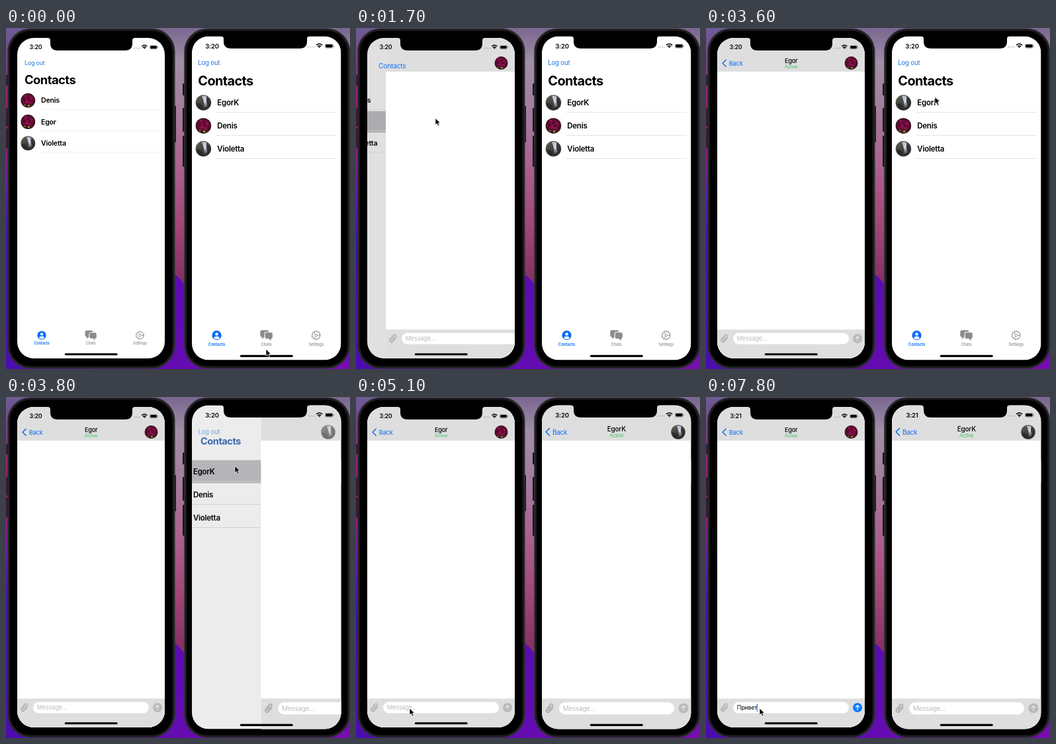
Write an HTML page that moves like this. It is 520 px wide and 516 px high and loops after 8 s.

```html
<!DOCTYPE html>
<html lang="en">
<head>
<meta charset="utf-8">
<title>Two phones, one chat</title>
<style>
  html, body { margin: 0; width: 100%; height: 100%; overflow: hidden; background: #3a0ca3; }
  svg { display: block; width: 520px; height: 516px; }
  text { font-family: Inter, Roboto, "Liberation Sans", sans-serif; letter-spacing: -.02em; white-space: pre; }
</style>
</head>
<body>
<svg id="stage" viewBox="0 0 520 516" xmlns="http://www.w3.org/2000/svg">
  <defs>
    <linearGradient id="sky" x2="0" y2="1">
      <stop offset="0" stop-color="#7a6690"/><stop offset=".1" stop-color="#a08fa6"/>
      <stop offset=".25" stop-color="#a57b9c"/><stop offset=".42" stop-color="#aa608c"/>
      <stop offset=".57" stop-color="#a14878"/><stop offset=".74" stop-color="#863062"/>
    </linearGradient>
    <linearGradient id="edge" x2="0" y2="1">
      <stop offset="0" stop-color="#6d5c94"/><stop offset=".12" stop-color="#7c3a86"/>
      <stop offset=".22" stop-color="#98206f"/><stop offset=".34" stop-color="#951f76"/>
      <stop offset=".46" stop-color="#6a1fa0"/><stop offset=".6" stop-color="#430fb0"/>
    </linearGradient>
    <linearGradient id="wave" x2="1" y2=".3">
      <stop offset="0" stop-color="#400eac"/><stop offset=".5" stop-color="#550cb0"/>
      <stop offset="1" stop-color="#760cb2"/>
    </linearGradient>
    <linearGradient id="rock" x2=".5" y2="1">
      <stop offset="0" stop-color="#62645c"/><stop offset=".5" stop-color="#454840"/>
      <stop offset="1" stop-color="#2a2d2b"/>
    </linearGradient>
    <linearGradient id="fall" x2="0" y2="1">
      <stop offset="0" stop-color="#b9bacb"/><stop offset=".5" stop-color="#d4d4e2"/>
      <stop offset="1" stop-color="#80828e" stop-opacity=".4"/>
    </linearGradient>
    <radialGradient id="bloom">
      <stop offset="0" stop-color="#870e44"/><stop offset=".65" stop-color="#6c0a38"/>
      <stop offset="1" stop-color="#33121f"/>
    </radialGradient>
  </defs>
</svg>
<script>
const NS = 'http://www.w3.org/2000/svg';
const LOOP = 8000, STEP = 100;
const BLUE = '#0a6cf5', GREY = '#8b8b8b', BAR = '#dedede';
const stage = document.getElementById('stage');

function el(tag, attrs, parent = stage) {
  const node = document.createElementNS(NS, tag);
  set(node, attrs);
  return parent.appendChild(node);
}
function set(node, attrs) {
  for (const key in attrs) node.setAttribute(key, attrs[key]);
}
const show = (node, on) => set(node, { display: on ? 'inline' : 'none' });
const clamp = v => Math.max(0, Math.min(1, v));
const mix = (a, b, p) => a + (b - a) * p;

const group = (parent, attrs = {}) => el('g', attrs, parent);
const path = (parent, d, attrs) => el('path', { d, ...attrs }, parent);
const circle = (parent, cx, cy, r, fill, attrs) => el('circle', { cx, cy, r, fill, ...attrs }, parent);
const rect = (parent, x, y, width, height, fill, rx = 0, attrs) =>
  el('rect', { x, y, width, height, fill, rx, ...attrs }, parent);

// Text placed by the middle of its capitals.
function label(parent, str, x, cy, size, fill = '#000', weight = 400, anchor = 'start') {
  const node = el('text', {
    x, y: cy + size * .364, 'font-size': size, fill, 'font-weight': weight, 'text-anchor': anchor
  }, parent);
  node.textContent = str;
  return node;
}

function avatar(parent, kind, cx, cy, r) {
  const g = group(parent, { transform: `translate(${cx} ${cy}) scale(${r / 10})` });
  if (kind === 'fall') {
    circle(g, 0, 0, 10, 'url(#rock)');
    path(g, 'M-2-8.5Q1-9.5 4-8Q3-2 5 4Q3 7 1 6Q1-2-2-8.5Z', { fill: 'url(#fall)' });
    path(g, 'M-9 1Q-4 0-1 5L-2 9.6Q-7 8-9 1Z', { fill: '#222522', opacity: .7 });
    path(g, 'M5-7Q9-4 9 3L6 5Q4-1 5-7Z', { fill: '#2b2d2a', opacity: .6 });
  } else {
    circle(g, 0, 0, 10, 'url(#bloom)');
    for (let i = 0; i < 9; i++) {
      const a = i * 2.4, d = 2 + i * .75;
      circle(g, Math.cos(a) * d, Math.sin(a) * d, 1.5, i % 2 ? '#980f50' : '#430a29');
    }
    path(g, 'M-7.5 5Q0 4 7.5 5.5Q4 10 0 10T-7.5 5Z', { fill: '#2c2a22', opacity: .65 });
    circle(g, 1, 7.3, 1.3, '#cf8a3a');
    circle(g, -4.5, 6.4, .9, '#a8702f');
  }
  return g;
}

function tabBar(parent, c) {
  const g = group(parent);
  const icon = i => group(g, { transform: `translate(${c.tabs + i * c.tabGap} 465) scale(${c.k})` });
  const person = icon(0), chats = icon(1), gear = icon(2);

  circle(person, 0, 0, 6.6, BLUE);
  circle(person, 0, -1.7, 2.1, '#fff');
  path(person, 'M-4 4.1Q-3.6 1.3 0 1.3T4 4.1Q2.2 5.6 0 5.6T-4 4.1Z', { fill: '#fff' });

  rect(chats, -8.6, -7.2, 12, 9.6, GREY, 2.4);
  path(chats, 'M-6 1V5.6L-1.5 1Z', { fill: GREY });
  rect(chats, -2.3, -4.4, 11.3, 9.5, GREY, 2.6, { stroke: '#fff' });
  path(chats, 'M3 4.5L6.5 7.6V4Z', { fill: GREY });

  const line = { fill: 'none', stroke: GREY, 'stroke-width': .8 };
  circle(gear, 0, 0, 5.3, 'none', line);
  circle(gear, 0, 0, 6.1, 'none', { ...line, 'stroke-width': 1, 'stroke-dasharray': '1.6 1.6' });
  circle(gear, 0, 0, 1.7, 'none', line);
  path(gear, 'M1.7 0H5M-.9-1.5L-2.6-4.5M-.9 1.5L-2.6 4.5', line);

  ['Contacts', 'Chats', 'Settings'].forEach((name, i) =>
    label(g, name, c.tabs + i * c.tabGap, c.tabText, 5.6 * c.k, i ? GREY : BLUE, i ? 500 : 600, 'middle'));
  return g;
}

function statusBar(parent, c) {
  const clock = label(parent, '', c.clockX, c.statusY, 8.8 * c.k, '#000', 600, 'middle');
  const g = group(parent, { transform: `translate(${c.wifiX} ${c.statusY}) scale(${c.k})` });
  for (let i = 0; i < 4; i++) circle(g, -15.3 + i * 2.7, 1.4, .75, '#9a9a9a');
  const arc = { fill: 'none', stroke: '#000', 'stroke-width': 1.3 };
  path(g, 'M-4.2-1.2Q0-4.8 4.2-1.2M-2.5.8Q0-1.3 2.5.8', arc);
  path(g, 'M-1.3 1.6Q0 .5 1.3 1.6L0 3Z', {});
  rect(g, 8.2, -2.7, 11, 5.6, '#fff', 1.6, { stroke: '#777', 'stroke-width': .6 });
  rect(g, 8.9, -2, 9.6, 4.2, '#000', 1);
  rect(g, 19.8, -.9, .9, 2, '#777', .4);
  return clock;
}

function inputBar(parent, c) {
  rect(parent, c.x, 456.3, c.w, 60, BAR);
  const y = c.inputY, h = 17 * c.k;
  const clip = group(parent, { transform: `translate(${c.clipX} ${y}) scale(${c.k}) rotate(40)` });
  path(clip, 'M2.9-3.6V3.6A2.9 2.9 0 0 1-2.9 3.6V-4.4A2 2 0 0 1 1.2-4.4V2.8A1 1 0 0 1-1 2.8V-3',
    { fill: 'none', stroke: '#8f8f8f', 'stroke-width': .9, 'stroke-linecap': 'round' });
  rect(parent, c.fieldX, y - h / 2, c.fieldW, h, '#fff', h / 2);
  const hint = label(parent, 'Message...', c.fieldX + 5.7, y, 9.2 * c.k, '#bcbcc0');
  const text = label(parent, '', c.fieldX + 5.8, y, 8.8 * c.k);
  const caret = rect(parent, 0, y - 6, 1.1, 12, '#2f6cf0');
  const send = group(parent, { transform: `translate(${c.sendX} ${y}) scale(${c.k})` });
  const disc = circle(send, 0, 0, 7, '#b9b9b9');
  const arrow = path(send, 'M0 3.6V-3.3M-2.8-.7L0-3.5L2.8-.7',
    { fill: 'none', 'stroke-width': 1.2, 'stroke-linecap': 'round', 'stroke-linejoin': 'round' });
  return (typed, focused) => {
    show(hint, !typed);
    text.textContent = typed;
    show(caret, focused);
    set(caret, { x: c.fieldX + 5.5 + (typed ? text.getComputedTextLength() : 0) });
    set(disc, { fill: typed ? '#087bff' : '#b9b9b9' });
    set(arrow, { stroke: typed ? '#fff' : '#e4e4e4' });
  };
}

function phone(c) {
  const { x, y, w, h, k } = c, right = x + w;

  c.buttons.forEach(([bx, by, bh]) => rect(stage, bx, by, 4, bh, '#17171a', 1));
  rect(stage, c.outX, 1.5, c.outW, 513, '#000', 34, { stroke: '#2e2e31', 'stroke-width': 2 });
  rect(stage, c.outX + 2, 3.5, c.outW - 4, 509, '#000', 32, { stroke: '#1b1b1d', 'stroke-width': 2 });

  const id = 'screen' + x;
  rect(el('clipPath', { id }), x, y, w, h, '#fff', 25);
  const screen = group(stage, { 'clip-path': `url(#${id})` });
  rect(screen, x, y, w, h, '#fff');

  const list = group(screen);
  const rowY = i => c.rowY + i * c.rowH;
  const picked = rect(list, x, rowY(c.pick) - c.rowH / 2, w * 1.4, c.rowH, '#c4c4c8');
  c.people.forEach(([name, kind], i) => {
    avatar(list, kind, c.avatarX, rowY(i), 10.9 * k);
    label(list, name, c.nameX, rowY(i), 10.6 * k, '#000', 600);
    rect(list, c.nameX - 1.5, rowY(i) + 13.6 * k - .4, right - 5.5 - c.nameX, .8, c.rule);
  });
  const tabs = tabBar(screen, c);
  const dim = rect(screen, x, y, w, h, '#000');

  const chat = group(screen);
  rect(chat, x, y, w, h, '#fff');
  rect(chat, x, y, w, 65.5 - y, BAR);
  rect(chat, x, 65.2, w, .5, '#d2d2d2');
  const input = inputBar(chat, c);

  const logOut = label(screen, 'Log out', c.titleX, c.navY, 8.9 * k, '#1f76de');
  const title = label(screen, 'Contacts', 0, 0, 18);
  title.style.letterSpacing = '-.03em';
  const face = avatar(screen, c.people[c.pick][1], c.faceX, 53, 10 * k);
  const nav = group(screen);
  path(nav, `M${c.backX + 5.2 * k} ${c.navY - 5 * k}l${-5 * k} ${5 * k}l${5 * k} ${5 * k}`,
    { fill: 'none', stroke: BLUE, 'stroke-width': 1.5, 'stroke-linecap': 'round', 'stroke-linejoin': 'round' });
  label(nav, 'Back', c.backX + 8.9 + k, c.navY + .3, 9.2 * k, BLUE);
  label(nav, c.people[c.pick][0], c.mid, 49.2 - (k - 1) * 10, 9.2 * k, '#000', 500, 'middle');
  label(nav, 'Active', c.mid, 58.7, 6.9 * k, '#3fc463', 400, 'middle');

  const clock = statusBar(screen, c);
  rect(screen, c.mid - 40, c.homeY, 80, 3.1, '#000', 1.55);

  const n0 = c.notchX, n1 = n0 + c.notchW, nb = c.notchY;
  path(stage, `M${n0 - 4} ${y - 1}V${y}Q${n0} ${y} ${n0} ${y + 4}V${nb - 11}Q${n0} ${nb} ${n0 + 11} ${nb}` +
    `H${n1 - 11}Q${n1} ${nb} ${n1} ${nb - 11}V${y + 4}Q${n1} ${y} ${n1 + 4} ${y}V${y - 1}Z`, {});

  return ({ p, time, typed = '', focused = false }) => {
    const shift = p * w * .3;
    set(list, { transform: `translate(${-shift} 0)` });
    show(picked, p > 0);
    show(tabs, p === 0);
    set(dim, { opacity: p * .14 });
    show(chat, p > 0);
    set(chat, { transform: `translate(${w * (1 - p)} 0)` });
    set(logOut, { opacity: clamp(1 - p * p * 1.4) });

    const size = 18.4 * k * (1 - .5 * p);
    const blue = clamp(p * 1.15);
    const blend = .75 + .25 * Math.abs(1 - 2 * p);
    set(title, {
      x: c.titleX + 7 * p, y: c.titleY - 23.5 * p + size * .364, 'font-size': size,
      'font-weight': p > .7 ? 400 : 700,
      fill: `rgb(${mix(0, 10, blue)},${mix(0, 108, blue)},${mix(0, 245, blue)})`,
      opacity: blend * clamp((.97 - p) / .07)
    });
    set(nav, { opacity: clamp((p - .89) / .09) });
    set(face, { opacity: clamp(p * 1.14) });
    clock.textContent = time;
    input(typed, focused);
  };
}

rect(stage, 0, 0, 520, 516, 'url(#sky)');
rect(stage, 0, 0, 120, 516, 'url(#edge)');
path(stage, 'M0 330Q180 320 252 370Q266 380 276 398L520 300V516H0Z', { fill: 'url(#wave)' });

const left = phone({
  x: 17, y: 15, w: 223, h: 485, k: 1, outX: 3.2, outW: 251.3, mid: 128.7, rule: '#ebebed',
  buttons: [[.5, 71, 16], [.5, 121, 28], [.5, 152, 30], [253, 118, 55]],
  notchX: 67, notchW: 124, notchY: 34, statusY: 29, clockX: 45, wifiX: 209.3,
  titleX: 28, titleY: 78, navY: 53.2, backX: 24.9, faceX: 219.5,
  rowY: 109.6, rowH: 32.4, avatarX: 33.3, nameX: 53, pick: 1,
  people: [['Denis', 'bloom'], ['Egor', 'bloom'], ['Violetta', 'fall']],
  tabs: 54, tabGap: 74.2, tabText: 477.4,
  inputY: 470, clipX: 28, fieldX: 41, fieldW: 175, sendX: 229, homeY: 492.2
});
const right = phone({
  x: 281, y: 12.5, w: 225.5, h: 490, k: 1.08, outX: 270.2, outW: 249, mid: 393.8, rule: '#dedee0',
  buttons: [[267, 84, 18], [267, 121, 36], [267, 163, 47], [517.5, 134, 68]],
  notchX: 329, notchW: 126, notchY: 31, statusY: 27.2, clockX: 311.5, wifiX: 473.6,
  titleX: 290.3, titleY: 79.6, navY: 52.8, backX: 286.9, faceX: 487,
  rowY: 113, rowH: 34.9, avatarX: 298.4, nameX: 319.3, pick: 0,
  people: [['EgorK', 'fall'], ['Denis', 'bloom'], ['Violetta', 'fall']],
  tabs: 318.5, tabGap: 75.1, tabText: 478.7,
  inputY: 471, clipX: 293, fieldX: 307, fieldW: 174, sendX: 495, homeY: 494.8
});
const cursor = path(stage, 'M0 0V10.2L2.4 8L4.1 11.8L5.9 11L4.3 7.3H7.4Z',
  { fill: '#000', stroke: '#fff', 'stroke-width': .7 });

// Pointer stops: time, x, y
const route = [
  [0, 393, 486], [200, 377, 487], [300, 377, 487], [600, 172, 192], [700, 172, 192],
  [1300, 120, 136.5], [2300, 120, 136.5], [2900, 301, 195], [3200, 301, 195],
  [3600, 346, 104.5], [4100, 346, 104.5], [5000, 81, 471], [LOOP, 81, 471]
];
function pointer(t) {
  const i = route.findIndex((stop, n) => n && t <= stop[0]);
  const [t0, x0, y0] = route[i - 1], [t1, x1, y1] = route[i];
  const u = (t - t0) / (t1 - t0), s = u * u * (3 - 2 * u);
  return [mix(x0, x1, s), mix(y0, y1, s)];
}

// Critically damped spring for the screen push.
function push(t, start) {
  const u = Math.max(0, t - start) * .018;
  return u > 12 ? 1 : 1 - (1 + u) * Math.exp(-u);
}

const WORD = 'Привет', KEYS = [6400, 6900, 7300, 7500, 7600, 7700];

function draw(t) {
  const time = t < 7800 ? '3:20' : '3:21';
  const typed = WORD.slice(0, KEYS.filter(k => k <= t).length);
  left({ p: push(t, 1500), time, typed, focused: t >= 5500 });
  right({ p: push(t, 3700), time });
  set(cursor, { transform: `translate(${pointer(t)})` });
}

const begin = performance.now();
function tick() {
  const t = (performance.now() - begin) % LOOP;
  draw(Math.floor(t / STEP) * STEP);
  requestAnimationFrame(tick);
}
tick();
</script>
</body>
</html>
```
